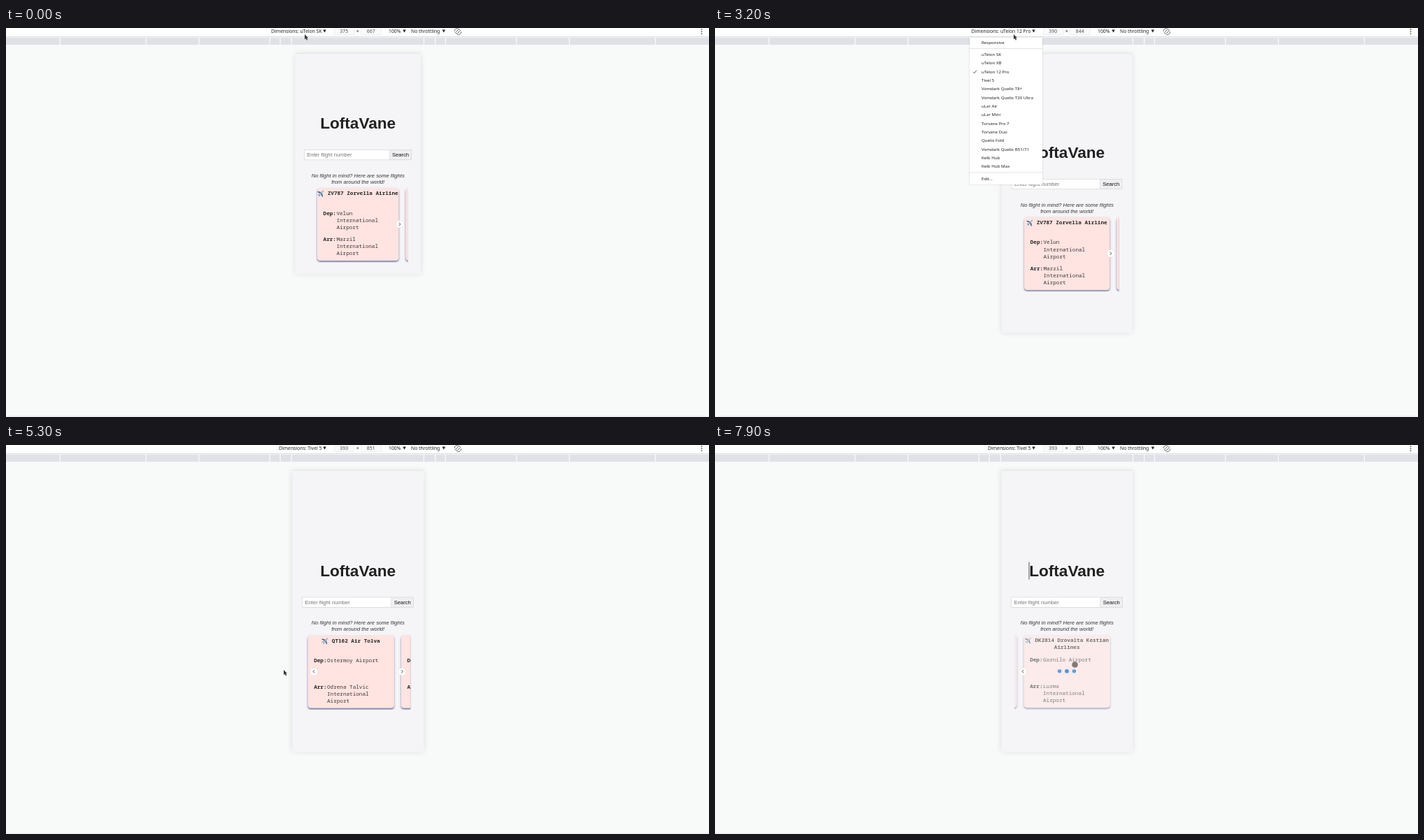
An HTML page with a canvas for the animation above (8000 ms loop, 1005x557 px).

```html
<!DOCTYPE html>
<html lang="en">
<head>
<meta charset="utf-8">
<title>Flight finder</title>
<style>
html, body { margin: 0; width: 100%; height: 100%; overflow: hidden; background: #f8faf9; }
canvas { display: block; }
</style>
</head>
<body>
<canvas id="stage" width="1005" height="557"></canvas>
<script>
const ctx = document.getElementById('stage').getContext('2d');
const LOOP = 8000, STEP = 100, CX = 503, TOP = 36.5;
const SANS = '"Liberation Sans", Arial, sans-serif';
const UI = '"Noto Sans", "Open Sans", sans-serif';
const MONO = '"Noto Sans Mono", monospace';
const CHAR = 4.59, LINE = 10.1, ROW = 12.31;
const BREAKPOINTS = [320, 375, 425, 768, 1024, 1440];

// Each device is shown from its time on; its menu opens at the time given.
const devices = [
  { from: 0, menu: 200, name: 'uTelon SK', w: 375, h: 667 },
  { from: 1000, menu: 1700, name: 'uTelon XB', w: 414, h: 896 },
  { from: 2400, menu: 3200, name: 'uTelon 12 Pro', w: 390, h: 844 },
  { from: 3600, menu: LOOP, name: 'Tivel 5', w: 393, h: 851 }
];
const menuRows = ['Responsive', ...devices.map(d => d.name),
  'Vomdark Quelix T8+', 'Vomdark Quelix T20 Ultra', 'uLar Air', 'uLar Mini', 'Torvane Pro 7',
  'Torvane Duo', 'Quelix Fold', 'Vomdark Quelix B51/71', 'Kelb Hub', 'Kelb Hub Max', 'Edit...'];

const flights = [
  { title: ['ZV787 Zorvella Airline'], dep: 'Velun International Airport', arr: 'Marzil International Airport' },
  { title: ['QT162 Air Tolva'], dep: 'Ostermoy Airport', arr: 'Odrena Talvic International Airport' },
  { title: ['V9844 Air Quorla'], dep: 'Nor Il Tavemek International Airport', arr: 'Pelvo International Airport' },
  { title: ['XB504 Belmorvan', 'Airlines'], dep: 'Tarvis International Airport', arr: 'Menola International Airport' },
  { title: ['DK2814 Drovalta Kestian', 'Airlines'], dep: 'Garnilo Airport', arr: 'Lurma International Airport' }
];

const button = { x: 427, y: 9 };
const moves = [
  { start: 300, end: 800, x: 425, y: 53 },
  { start: 1000, end: 1300, ...button },
  { start: 1700, end: 2000, x: 425, y: 69 },
  { start: 2100, end: 2300, x: 425, y: 63 },
  { start: 2700, end: 3000, ...button },
  { start: 3200, end: 3400, x: 422, y: 73 },
  { start: 3600, end: 4200, x: 562, y: 292 },
  { start: 4400, end: 5200, x: 397, y: 322 },
  { start: 5500, end: 6200, x: 496, y: 308 },
  { start: 6300, end: 6900, x: 366.5, y: 317 },
  { start: 7000, end: 7600, x: 514.5, y: 314.5 }
];

function ease(t, start, end) {
  const p = Math.min(1, Math.max(0, (t - start) / (end - start)));
  return p * p * (3 - 2 * p);
}

function pointerAt(t) {
  return moves.reduce((pos, m) => {
    const p = ease(t, m.start, m.end);
    return { x: pos.x + (m.x - pos.x) * p, y: pos.y + (m.y - pos.y) * p };
  }, button);
}

// Two flings, each passing two cards.
const scrollAt = t => 2 * ease(t, 4700, 5843) + 2 * ease(t, 6151, 7120);

function rect(x, y, w, h, fill) {
  ctx.fillStyle = fill;
  ctx.fillRect(x, y, w, h);
}

function disc(x, y, r, fill) {
  ctx.fillStyle = fill;
  ctx.beginPath();
  ctx.arc(x, y, r, 0, Math.PI * 2);
  ctx.fill();
}

function shape(points, fill) {
  ctx.fillStyle = fill;
  ctx.beginPath();
  points.forEach(([x, y]) => ctx.lineTo(x, y));
  ctx.closePath();
  ctx.fill();
}

function line(points, width, color) {
  ctx.strokeStyle = color;
  ctx.lineWidth = width;
  ctx.beginPath();
  points.forEach(([x, y]) => ctx.lineTo(x, y));
  ctx.stroke();
}

// y is the middle of the capitals.
function text(str, x, y, size, family, fill, align = 'left', style = '') {
  ctx.font = `${style} ${size}px ${family}`;
  ctx.textAlign = align;
  ctx.fillStyle = fill;
  ctx.fillText(str, x, y + size * .355);
  return ctx.measureText(str).width;
}

function wrap(str, limit) {
  return str.split(' ').reduce((lines, word) => {
    const joined = lines.length ? lines[lines.length - 1] + ' ' + word : word;
    return lines.length && joined.length <= limit
      ? [...lines.slice(0, -1), joined] : [...lines, word];
  }, []);
}

function drawRotateIcon(x, y) {
  ctx.save();
  ctx.translate(x, y);
  ctx.rotate(Math.PI / 4);
  ctx.strokeStyle = '#45474b';
  ctx.lineWidth = .8;
  ctx.strokeRect(-1.5, -3.6, 3, 7.2);
  for (const turn of [0, Math.PI]) {
    ctx.beginPath();
    ctx.arc(0, 0, 4.8, turn - .7, turn + .9);
    ctx.stroke();
  }
  ctx.restore();
}

// Returns the left edge of the device label.
function drawToolbar(device) {
  rect(0, 0, 1005, 12, '#fdfefe');
  rect(0, 12, 1005, 1, '#d8dbe0');
  rect(0, 13, 1005, 1, '#f4f5f7');
  rect(0, 14, 1005, 10, '#dfe1e7');
  for (const width of BREAKPOINTS)
    for (const side of [-1, 1])
      rect(CX - .8 + side * width * .2955, 13, 1.2, 11, '#fafbfc');
  rect(0, 555.5, 1005, 1, '#e9ebeb');

  const label = (s, x, align, color = '#222428') => text(s, x, 4.7, 6.8, UI, color, align);
  const width = label('Dimensions: ' + device.name, 451.5, 'right');
  label('×', 502.8, 'center');
  label('100%', 547);
  label('No throttling', 579);
  for (const x of [455.5, 569.5, 625.8])
    shape([[x - 2.3, 2.6], [x + 2.3, 2.6], [x, 6.6]], '#222428');
  [device.w, device.h].forEach((value, i) => {
    const x = 469 + i * 38.5;
    rect(x, 0, 29, 9.8, '#e4e6e9');
    rect(x + .6, 0, 27.8, 9.2, '#fafafb');
    label(value, x + 14.2, 'center', '#4a4c50');
  });
  drawRotateIcon(646, 5);
  for (let i = 0; i < 3; i++) disc(994.5, 2 + i * 3, .85, '#333');
  return 451.5 - width;
}

function drawPlane(x, y) {
  ctx.save();
  ctx.translate(x + 4.7, y);
  ctx.rotate(Math.PI / 4);
  for (const side of [-1, 1]) {
    shape([[0, -1.8], [side * 5.2, 1.2], [side * 5.2, 2.4], [0, 1.2]], '#3f6f98');
    shape([[0, 2.6], [side * 2.4, 4.4], [0, 4.4]], '#35597c');
  }
  ctx.lineCap = 'round';
  line([[0, -4.4], [0, 4]], 1.8, '#9dbccd');
  ctx.restore();
}

function drawCard(flight, x, y, w) {
  ctx.save();
  ctx.shadowColor = 'rgba(62,70,125,.75)';
  ctx.shadowBlur = 2.4;
  ctx.shadowOffsetY = 1.6;
  ctx.fillStyle = '#ffe4e1';
  ctx.beginPath();
  ctx.roundRect(x, y, w, 104.5, 4.5);
  ctx.fill();
  ctx.restore();

  const bold = (s, px, py) => text(s, px, py, 7.65, MONO, '#262626', 'left', 'bold');
  flight.title.forEach((row, i) => {
    const lead = i ? 0 : 14.1;
    const left = x + (w - row.length * CHAR - lead) / 2;
    if (!i) drawPlane(left, y + 7.8);
    bold(row, left + lead, y + 7.8 + i * LINE);
  });
  const limit = Math.floor((w - 37) / CHAR);
  [['Dep:', flight.dep], ['Arr:', flight.arr]].forEach(([tag, place], n) => {
    const top = y + 36 + n * 37.6;
    bold(tag, x + 8.7, top);
    wrap(place, limit).forEach((row, i) =>
      text(row, x + 27.5, top + i * LINE, 7.65, MONO, '#3c3838'));
  });
}

function drawArrow(x, y, dir) {
  disc(x, y, 5.8, 'rgba(60,60,80,.12)');
  disc(x, y, 5.4, '#fff');
  line([[x - dir, y - 2.2], [x + dir, y], [x - dir, y + 2.2]], .9, '#333');
}

function drawCarousel(width, y, t) {
  const half = width * .4, left = CX + .2 - half, right = left + half * 2;
  const cardW = half * 2 - 26.8, pitch = cardW + 9.8;
  const scroll = scrollAt(t), loading = t >= 7700;

  ctx.save();
  ctx.beginPath();
  ctx.rect(left, y - 3, half * 2, 110);
  ctx.clip();
  if (loading) ctx.filter = 'blur(0.5px)';
  flights.forEach((flight, i) => {
    const x = left + 13.4 + (i - scroll) * pitch;
    if (x < right && x + cardW > left) drawCard(flight, x, y - (loading ? .7 : 0), cardW);
  });
  ctx.filter = 'none';
  if (loading) rect(left, y - 3, half * 2, 110, 'rgba(245,245,248,.38)');
  ctx.restore();

  if (scroll > .02) drawArrow(left + 12, y + 52, -1);
  if (!loading) return drawArrow(right - 12, y + 52, 1);
  for (let i = -1; i <= 1; i++) {
    const glow = .5 + .5 * Math.cos((t - 7900) / 1000 * Math.PI * 2 - i * 1.4);
    disc(CX + i * 10.4, y + 51.5, 2.5 + glow * .4, `rgba(55,140,230,${.7 + glow * .2})`);
  }
}

function drawPhone(device, t) {
  const w = device.w * .478, h = device.h * .4735;
  const left = CX + .2 - w / 2, cy = TOP + h / 2;
  ctx.save();
  ctx.shadowColor = 'rgba(40,40,60,.13)';
  ctx.shadowBlur = 8;
  rect(left, TOP, w, h, '#f5f5f8');
  ctx.restore();
  rect(left, TOP - .5, w, 1, '#e6e6ea');

  text('LoftaVane', CX + .2, cy - 58, 22.6, SANS, '#212121', 'center', 'bold');
  if (t >= 4400 && t % 1000 >= 500) rect(448.5, cy - 70.5, 1, 25, '#55555a');

  const formW = 154 + (w - 179.2) * .62, x = CX - formW / 2, y = cy - 20.3;
  rect(x, y, formW, 15, '#cfcfd3');
  rect(x + .6, y + .6, formW - 32.8, 13.8, '#fff');
  rect(x + formW - 31.8, y + .6, 31.2, 13.8, '#efeff1');
  text('Enter flight number', x + 4.2, cy - 12.8, 7.62, SANS, '#757575');
  text('Search', x + formW - 16, cy - 12.8, 7.62, SANS, '#111', 'center');

  const limit = Math.floor(w * .23);
  wrap('No flight in mind? Here are some flights from around the world!', limit).forEach((row, i) =>
    text(row, CX + .2, cy + 16.6 + i * 9.1, 7.6, SANS, '#36363a', 'center', 'italic'));

  drawCarousel(w, cy + 34.4, t);
  return { left, right: left + w };
}

function drawMenu(x, device, pointerY) {
  const w = 104, last = menuRows.length - 1;
  ctx.save();
  ctx.shadowColor = 'rgba(0,0,0,.2)';
  ctx.shadowBlur = 2;
  rect(x, 13.5, w, 210.5, '#fff');
  ctx.restore();
  rect(x, 29, w, .8, '#dedede');
  rect(x, 206.5, w, .8, '#dedede');
  menuRows.forEach((name, i) => {
    // The first and last rows stand apart behind the rules.
    const gap = i === 0 ? -5.2 : i === last ? 5.2 : 0;
    const y = 38 + (i - 1) * ROW + gap;
    if (Math.abs(pointerY - y) <= ROW / 2) rect(x, y - ROW / 2, w, ROW, '#e8e8e8');
    text(name, x + 17, y, 6.15, UI, '#222');
    if (name === device.name)
      line([[x + 5, y + .3], [x + 6.6, y + 2], [x + 10, y - 2]], .8, '#333');
  });
}

function drawPointer(x, y) {
  line([[x + 1.8, y + 4], [x + 3.4, y + 8.2]], 1.5, '#353535');
  shape([[x, y], [x, y + 7.2], [x + 2, y + 5.4], [x + 5, y + 5.2]], '#353535');
}

function render(t) {
  const device = devices.findLast(d => d.from <= t);
  const { x, y } = pointerAt(t);
  rect(0, 0, 1005, 557, '#f8faf9');
  const labelX = drawToolbar(device);
  const phone = drawPhone(device, t);
  if (t >= device.menu) drawMenu(Math.round(labelX - 2.8), device, y);
  const touching = t > 3700 && y > TOP && x > phone.left && x < phone.right;
  if (touching) disc(x, y, 4.3, 'rgba(92,84,84,.76)');
  else drawPointer(x, y);
}

function tick(now) {
  render(Math.floor(now % LOOP / STEP) * STEP);
  requestAnimationFrame(tick);
}
requestAnimationFrame(tick);
</script>
</body>
</html>
```
